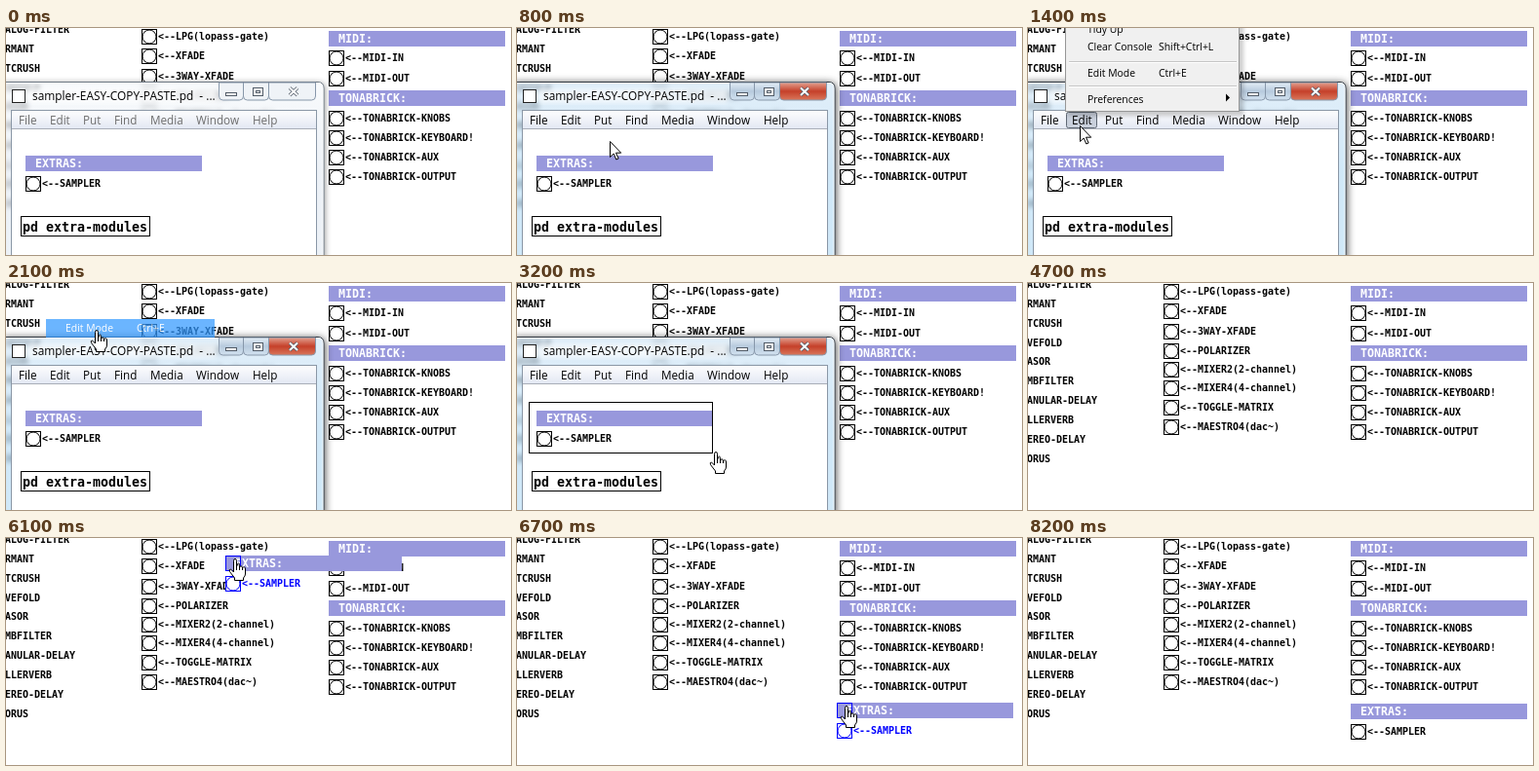
An HTML page that plays this animation: 518 px wide and 233 px high, repeating every 9.2 s.

```html
<!DOCTYPE html>
<html lang="en">
<head>
<meta charset="utf-8">
<title>Copy and paste a module</title>
<style>
html, body { margin: 0; width: 100%; height: 100%; overflow: hidden; background: #fff; }
svg { display: block; width: 518px; height: 233px; }
text { white-space: pre; }
.lbl, .head, .sub { font-family: "DejaVu Sans Mono", monospace; font-weight: bold; }
.lbl { font-size: 9.97px; }
.head { font-size: 11.63px; fill: #fff; }
.sub { font-size: 13.29px; }
.ui { font: 11.7px "Open Sans", sans-serif; }
.title { font: 11.85px "Open Sans", sans-serif; }
.menu { font: 10.4px "Open Sans", sans-serif; }
.box { fill: #fff; stroke: #000; }
.ring { fill: none; stroke: #000; }
.handle { fill: none; stroke: #00f; display: none; }
.sel .handle { display: inline; }
.sel .lbl { fill: #00f; }
.sel .box, .sel .ring { stroke: #00f; }
.bar { fill: #9898dc; }
.base { fill: #fff; filter: url(#strong); }
.idle .base { filter: url(#faint); }
.idle .ui { fill: #6d6d6d; }
</style>
</head>
<body>
<svg id="stage" viewBox="0 0 518 233" xmlns="http://www.w3.org/2000/svg"></svg>
<script>
const text = (cls, x, y, s, more = '') =>
  `<text class="${cls}" x="${x}" y="${y}" ${more}>${s.replace(/</g, '&lt;')}</text>`;
const rect = (x, y, w, h, more = '') =>
  `<rect x="${x}" y="${y}" width="${w}" height="${h}" ${more}/>`;
const bang = (x, cy, name) =>
  rect(x + .5, cy - 7.5, 15, 15, 'class="box"') +
  `<circle class="ring" cx="${x + 8}" cy="${cy}" r="7"/>` +
  text('lbl', x + 17, cy + 3, '<--' + name);
const header = (x, y, name) =>
  rect(x, y, 181, 16, 'class="bar"') + text('head', x + 10, y + 12, name);
const column = (x, rows) => rows.map(([y, name]) => bang(x, y, name)).join('');

const extras = id => `<g id="${id}">` + header(0, 0, 'EXTRAS:') +
  rect(.5, .5, 15, 15, 'class="handle"') + bang(0, 29, 'SAMPLER') + '</g>';

const names = ['ALOG-FILTER', 'RMANT', 'TCRUSH', 'VEFOLD', 'ASOR', 'MBFILTER',
  'ANULAR-DELAY', 'LLERVERB', 'EREO-DELAY', 'ORUS'];

const page = '<g id="page">' +
  names.map((s, i) => text('lbl', -1, Math.round(5 + i * 19.85), s)).join('') +
  column(139, [[9, 'LPG(lopass-gate)'], [29, 'XFADE'], [50, '3WAY-XFADE'], [70, 'POLARIZER'],
    [89, 'MIXER2(2-channel)'], [108, 'MIXER4(4-channel)'], [128, 'TOGGLE-MATRIX'], [148, 'MAESTRO4(dac~)']]) +
  header(331, 3, 'MIDI:') + column(331, [[31, 'MIDI-IN'], [52, 'MIDI-OUT']]) +
  header(331, 64, 'TONABRICK:') +
  column(331, [[93, 'TONABRICK-KNOBS'], [113, 'TONABRICK-KEYBOARD!'],
    [133, 'TONABRICK-AUX'], [153, 'TONABRICK-OUTPUT']]) + '</g>';

const shape = 'M-4 240V55.5H320Q326 55.5 326 62V240Z';
const caption = (x, w, fill) =>
  `<path d="M${x} 56V70Q${x} 74 ${x + 4} 74H${x + w - 4}Q${x + w} 74 ${x + w} 70V56Z" fill="${fill}" stroke="#8797aa"/>`;
const frame = (id, fill, btn, close, edge) => `<g id="${id}">` +
  `<path d="${shape}" fill="url(#${fill})" stroke="${edge}"/>` +
  `<path d="M-4 56.5H320Q325 56.5 325 62V240" fill="none" stroke="#fff" stroke-opacity=".75"/>` +
  caption(218.5, 25, btn) + caption(243.5, 26, btn) + caption(269.5, 48, close) +
  rect(225.5, 66.5, 11, 3, 'fill="#fff" stroke="#525c68"') +
  rect(253.5, 61.5, 10, 8, 'fill="#fff" stroke="#525c68"') + rect(256.5, 64.5, 4, 2, 'fill="#fff" stroke="#525c68"') +
  '<path d="M291 61.5l8 7.5M299 61.5l-8 7.5" stroke="#525c68" stroke-width="3.6"/>' +
  '<path d="M291 61.5l8 7.5M299 61.5l-8 7.5" stroke="#fff" stroke-width="2"/></g>';

const menuBar = [['File', 13], ['Edit', 45], ['Put', 79], ['Find', 111], ['Media', 148], ['Window', 195], ['Help', 253]];
const win = '<g id="win">' +
  `<path class="base" d="${shape}"/>` +
  '<g clip-path="url(#glass)"><use href="#page" filter="url(#blur)"/></g>' +
  frame('idleFrame', 'gIdle', '#eff3f7', '#eff3f7', '#6d7883') +
  frame('liveFrame', 'gLive', 'url(#gBtn)', 'url(#gRed)', '#2f3740') +
  rect(22, 63, 194, 14, 'fill="#fff" opacity=".6" filter="url(#blur)"') +
  rect(6.5, 63.5, 13, 13, 'fill="#fff" stroke="#222"') +
  text('title', 27, 74, 'sampler-EASY-COPY-PASTE.pd  - ...') +
  rect(5.5, 84.5, 313, 160, 'fill="#fff" stroke="#8a97a6"') +
  rect(6, 85, 312, 18, 'fill="url(#gMenu)"') + rect(6, 103, 312, 1, 'fill="#a9aeb8"') +
  rect(39.5, 86.5, 31, 16, 'id="pressed" rx="2" fill="#c9d0dc" stroke="#5f6874"') +
  menuBar.map(([s, x]) => text('ui', x, 99, s)).join('') +
  `<g transform="translate(20 131)">${extras('source')}</g>` +
  rect(15.5, 193.5, 132, 20, 'fill="#fff" stroke="#000"') +
  text('sub', 17, 209, 'pd extra-modules') +
  '<rect id="lasso" x="12.5" y="122.5" fill="none" stroke="#000"/></g>';

const menuRow = (y, a, b = '', fill = '#000') =>
  text('menu', 61, y, a, `fill="${fill}"`) + text('menu', 134, y, b, `fill="${fill}"`);
const rule = y => rect(42, y, 172, 1, 'fill="#c6c6c6"') + rect(42, y + 1, 172, 1, 'fill="#fff"');
const menu = '<g id="menu">' +
  rect(41, -8, 180, 98, 'opacity=".2" filter="url(#soft)"') +
  rect(38.5, -9.5, 178, 95, 'fill="#f0f0f0" stroke="#979797"') +
  menuRow(5, 'Tidy Up') + menuRow(23, 'Clear Console', 'Shift+Ctrl+L') + rule(34) +
  menuRow(50, 'Edit Mode', 'Ctrl+E') + rule(59) + menuRow(77, 'Preferences') +
  '<path d="M203 67.5v8l4-4z"/></g>' +
  '<g id="pick">' + rect(41, 37, 173, 19, 'fill="#3399ff"') + menuRow(50, 'Edit Mode', 'Ctrl+E', '#fff') + '</g>';

const cursors =
  '<path id="arrow" d="M.5.5V16.5l3.7-3.5 2.6 6 2.3-1-2.6-5.8h5.2Z" fill="#fff" stroke="#000"/>' +
  '<g id="hand"><path d="M-1.5 13V1.5Q-1.5-.5 0-.5T1.5 1.5V7.5Q4 0 4.5 7.5 7 5.5 7.5 8.5 10.5 6.5 10.5 10V15' +
  'Q10.5 17 8.5 19V21.5H-.5V19L-5.5 12.5Q-6.5 10-4.5 10Z" fill="#fff" stroke="#000" stroke-linejoin="round"/>' +
  '<path d="M1.5 7v4M4.5 7v4M7.5 8v3" stroke="#000"/></g>';

const grad = (id, ...stops) => `<linearGradient id="${id}" x2="0" y2="1">` + stops.map((c, i) =>
  `<stop offset="${i / (stops.length - 1)}" stop-color="${c}"/>`).join('') + '</linearGradient>';
const shadow = (id, size, alpha) => `<filter id="${id}" x="-10%" y="-10%" width="120%" height="120%">` +
  `<feDropShadow dx="1" dy="1" stdDeviation="${size}" flood-opacity="${alpha}"/></filter>`;

document.getElementById('stage').innerHTML = '<defs>' +
  grad('gIdle', '#f5f8fbb0', '#e4ebf3b0', '#e4ebf3b0') + grad('gLive', '#d2e6f6a8', '#b8dcf4a8', '#b8dcf4a8') +
  grad('gBtn', '#e3edf6', '#b7cadd', '#d2e2f0') + grad('gRed', '#e3a08f', '#c5402a', '#d9765a') +
  grad('gMenu', '#fdfdfe', '#e3e8f3') +
  `<clipPath id="glass"><path d="${shape}"/></clipPath>` +
  '<filter id="blur"><feGaussianBlur stdDeviation="2.6"/></filter><filter id="soft"><feGaussianBlur stdDeviation="2"/></filter>' +
  shadow('faint', 3, .45) + shadow('strong', 4, .75) + '</defs>' +
  rect(0, 0, 518, 233, 'fill="#fff"') + page + win + menu + extras('copy') + cursors;

const $ = id => document.getElementById(id);
const show = (id, on) => { $(id).style.display = on ? '' : 'none'; };
const put = (id, [x, y]) => $(id).setAttribute('transform', `translate(${x} ${y})`);

// [time, x, y]
const pointer = [[100, 436, 205], [500, 270, 175], [900, 62, 105], [1000, 53, 100], [1400, 53, 100], [1900, 93, 49],
  [2200, 93, 49], [2600, 13, 122], [3000, 197, 165], [3200, 204, 174], [3300, 214, 178], [3500, 216, 179], [4000, 376, 193]];
const drag = [[6000, 225, 18], [6100, 225, 18], [6600, 328, 169], [6900, 328, 169], [7200, 331, 170]];
const leave = [[7200, 341, 174], [7800, 476, 207]];

function along(path, t) {
  let i = 1;
  while (i < path.length - 1 && t > path[i][0]) i++;
  const [t0, x0, y0] = path[i - 1], [t1, x1, y1] = path[i];
  const k = Math.min(1, Math.max(0, (t - t0) / (t1 - t0)));
  const e = k * k * (3 - 2 * k);
  return [Math.round(x0 + (x1 - x0) * e), Math.round(y0 + (y1 - y0) * e)];
}
const between = (t, a, b) => t >= a && t < b;

function draw(t) {
  const live = t >= 600;
  show('win', t < 4000);
  show('idleFrame', !live);
  show('liveFrame', live);
  $('win').classList.toggle('idle', !live);
  show('pressed', between(t, 1000, 2100));
  show('menu', between(t, 1100, 2100));
  show('pick', between(t, 1800, 2200));
  $('pick').style.opacity = t < 2100 ? 1 : .72;

  const at = along(pointer, t);
  show('lasso', between(t, 2700, 3300));
  const corner = t < 3200 ? at : [201, 175];
  $('lasso').setAttribute('width', Math.max(0, corner[0] - 13));
  $('lasso').setAttribute('height', Math.max(0, corner[1] - 123));
  $('source').classList.toggle('sel', t >= 3300);

  const spot = along(drag, t);
  show('copy', t >= 6000);
  put('copy', spot);
  $('copy').classList.toggle('sel', t < 8000);

  show('arrow', between(t, 100, 2100));
  put('arrow', at);
  show('hand', between(t, 2100, 4700) || between(t, 6000, 8200));
  put('hand', t < 5000 ? at : t < 7200 ? [spot[0] + 10, spot[1] + 4] : along(leave, t));
}

const start = performance.now();
function tick() {
  const t = (performance.now() - start) % 9200;
  draw(Math.floor(t / 100) * 100);
  requestAnimationFrame(tick);
}
tick();
</script>
</body>
</html>
```
